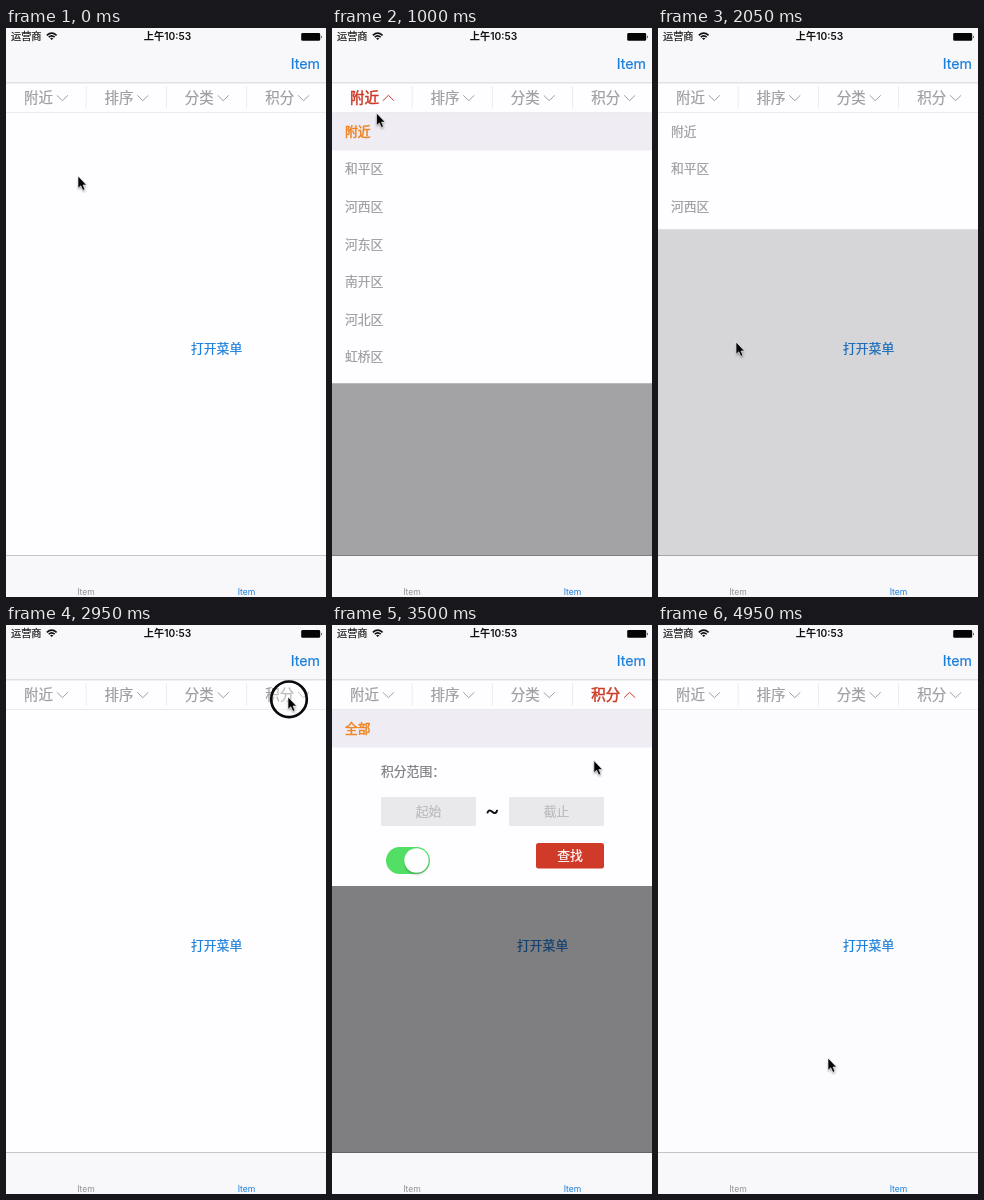
An HTML page for the animation above (4.99 s loop, 320x569 px).

```html
<!DOCTYPE html>
<html lang="zh-CN">
<head>
<meta charset="utf-8">
<title>Dropdown menu</title>
<style>
html, body { margin: 0; width: 100%; height: 100%; overflow: hidden; background: #fefdff; }
svg { display: block; width: 100vw; height: 100vh; }
text { font-family: Inter, "Noto Sans CJK SC", "Noto Sans CJK", sans-serif; fill: currentColor; }
.ink { stroke: currentColor; stroke-width: .22px; }
.lit { stroke-width: .5px; }
.blue { color: #1b7fdc; }
</style>
</head>
<body>
<svg id="stage" viewBox="0 0 320 569" preserveAspectRatio="none">
  <defs>
    <clipPath id="clip"><rect id="clipBox" x="0" y="84.5" width="320" height="0"/></clipPath>
    <filter id="soft" x="-50%" y="-50%" width="200%" height="200%"><feGaussianBlur stdDeviation="1.1"/></filter>
  </defs>
  <rect width="320" height="569" fill="#fefdff"/>
  <text class="blue ink" x="185" y="324.7" font-size="12.8">打开菜单</text>

  <rect y="527" width="320" height="42" fill="#f8f7f9"/>
  <rect y="527" width="320" height="1" fill="#c6c5c8"/>
  <g font-size="8.6" text-anchor="middle">
    <text x="80" y="567" color="#929194">Item</text>
    <text class="blue" x="240.5" y="567">Item</text>
  </g>

  <rect id="dim" y="84.5" width="320" height="443.5" fill="#020003" opacity="0"/>

  <g clip-path="url(#clip)">
    <rect y="84.5" width="320" height="377" fill="#fefdff"/>
    <rect id="mark" y="84.5" width="320" height="38" fill="#efedf3"/>
    <g id="areas"></g>
    <g id="score" font-size="12.8">
      <text id="all" x="13" y="107.7">全部</text>
      <text class="ink" x="49" y="151.4" color="#7c7b7d">积分范围：</text>
      <g fill="#e9e8ea">
        <rect x="49" y="172" width="95" height="29"/>
        <rect x="177" y="172" width="95" height="29"/>
      </g>
      <g color="#bcbbbf" text-anchor="middle">
        <text class="ink" x="96.5" y="191">起始</text>
        <text class="ink" x="224.5" y="191">截止</text>
      </g>
      <path d="M155.3 188.4C156 184.6 158.2 184.8 160.3 186.8S164.6 188.6 165.2 184.9" fill="none" stroke="#111" stroke-width="2"/>
      <rect x="54" y="222" width="44" height="27" rx="13.5" fill="#53df66"/>
      <circle cx="84.5" cy="237.5" r="12" fill="#000" opacity=".22" filter="url(#soft)"/>
      <circle cx="84.5" cy="235.5" r="12.2" fill="#fefefe"/>
      <rect x="204" y="218" width="68" height="25.5" rx="2.5" fill="#d03a28"/>
      <text class="ink" x="238" y="235.3" color="#fff" text-anchor="middle">查找</text>
    </g>
  </g>

  <rect width="320" height="55" fill="#f8f7f9"/>
  <rect y="54.5" width="320" height="1" fill="#c9c8cb"/>
  <rect y="55.5" width="320" height="28.5" fill="#fefdff"/>
  <rect y="84" width="320" height="1" fill="#ebeaec"/>
  <g id="tabs" font-size="14.5"></g>

  <text class="ink" x="5" y="12.4" font-size="10.2" color="#222">运营商</text>
  <g fill="none" stroke="#111" stroke-width="1.6">
    <path d="M40.8 7.4Q45.7 3 50.6 7.4M42.7 9.2Q45.7 6.6 48.7 9.2"/>
    <path d="M44.1 10.4L45.7 12L47.3 10.4Q45.7 9.2 44.1 10.4Z" fill="#111" stroke="none"/>
  </g>
  <text x="161.5" y="12.4" font-size="10.2" font-weight="600" color="#111" text-anchor="middle">上午10:53</text>
  <rect x="295.2" y="5" width="19" height="7.8" rx="1.4" fill="#050505"/>
  <path d="M315 7.4Q316.8 8.9 315 10.4Z" fill="#111"/>
  <text class="blue ink" x="314" y="41" font-size="14.2" text-anchor="end">Item</text>

  <g id="pointer">
    <circle id="press" cx="1" cy="2.3" r="17.8" fill="#fff" fill-opacity=".3" stroke="#0a0a0c" stroke-width="2.7"/>
    <path d="M0 2V14L3 11.5L5 16L7.5 15L5.5 10.5H9Z" fill="#000" opacity=".35" filter="url(#soft)"/>
    <path d="M0 0V12.3L2.8 9.8L4.8 14.3L6.9 13.4L5 9H8.6Z" fill="#050505" stroke="#fff" stroke-width=".6"/>
  </g>
</svg>
<script>
const LOOP = 4990, SLIDE = 450, TURN = 150;
const GRAY = '#9f9ea1', RED = '#cd3a26', ORANGE = '#ee811c';
const $ = id => document.getElementById(id);
const set = (el, k, v) => el.setAttribute(k, v);

function add(parent, tag, attrs, text) {
  const el = document.createElementNS('http://www.w3.org/2000/svg', tag);
  for (const k in attrs) set(el, k, attrs[k]);
  if (text) el.textContent = text;
  return parent.appendChild(el);
}

function tint(el, lit, color) {
  set(el, 'color', lit ? color : GRAY);
  set(el, 'class', lit ? 'ink lit' : 'ink');
}

const areaRows = ['附近', '和平区', '河西区', '河东区', '南开区', '河北区', '虹桥区', '北辰区', '西青区', '津南区']
  .map((s, i) => add($('areas'), 'text', { class: 'ink', x: 13, y: 107.7 + i * 37.6, 'font-size': 12.8, color: GRAY }, s));

const tabs = ['附近', '排序', '分类', '积分'].map((s, i) => {
  const x = i * 80.4;
  if (i) add($('tabs'), 'rect', { x: i * 80.2 - .5, y: 58.5, width: 1, height: 22, fill: '#ecebed' });
  return {
    x: x + 56.4,
    label: add($('tabs'), 'text', { x: x + 18, y: 75.2 }, s),
    arrow: add($('tabs'), 'path', { d: 'M-5.5 -2.7L0 2.7L5.5 -2.7', fill: 'none', 'stroke-width': 1 })
  };
});

// on/off: tap releases; open/close: start of each slide
const menus = [
  { tab: 0, height: 376, on: 680, open: 716, off: 1765, close: 1775 },
  { tab: 3, height: 176.5, on: 2990, open: 3015, off: 4500, close: 4538 }
];
const presses = [[545, 680], [1630, 1765], [2820, 2990], [4315, 4500]];
// time, x, y
const path = [
  [0, 72, 148], [40, 72, 148], [490, 41, 67], [900, 41, 67], [1410, 84, 299], [1610, 78, 314],
  [2140, 78, 314], [2320, 143, 239], [2790, 282, 72], [3200, 282, 72], [3500, 262, 135],
  [3910, 186, 418], [4290, 170, 433], [LOOP, 170, 433]
];

const clamp = v => Math.max(0, Math.min(1, v));

// cubic-bezier(.42, 0, .58, 1)
function ease(x) {
  x = clamp(x);
  let lo = 0, hi = 1;
  for (let i = 0; i < 24; i++) {
    const s = (lo + hi) / 2, r = 1 - s;
    if (1.26 * r * r * s + 1.74 * r * s * s + s * s * s < x) lo = s; else hi = s;
  }
  return lo * lo * (3 - 2 * lo);
}

function slope(i, k) {
  const a = path[i - 1], b = path[i], c = path[i + 1];
  if (!a || !c) return 0;
  const still = (p, q) => p[1] === q[1] && p[2] === q[2];
  return still(a, b) || still(b, c) ? 0 : (c[k] - a[k]) / (c[0] - a[0]);
}

function along(t, k) {
  let i = 0;
  while (i < path.length - 2 && t >= path[i + 1][0]) i++;
  const a = path[i], b = path[i + 1], d = b[0] - a[0], u = (t - a[0]) / d, v = 1 - u;
  return v * v * (1 + 2 * u) * a[k] + u * u * (3 - 2 * u) * b[k]
    + d * u * v * (v * slope(i, k) - u * slope(i + 1, k));
}

function draw(t) {
  const menu = menus[t < 2600 ? 0 : 1];
  const active = t >= menu.on && t < menu.off;
  const shown = ease((t - menu.open) / SLIDE) - ease((t - menu.close) / SLIDE);
  const turn = ease((t - menu.on) / TURN) - ease((t - menu.off) / TURN);

  tabs.forEach((tab, i) => {
    const mine = menu.tab === i, lit = active && mine;
    tint(tab.label, lit, RED);
    set(tab.arrow, 'stroke', lit ? RED : GRAY);
    set(tab.arrow, 'transform', `translate(${tab.x} 70) rotate(${mine ? 180 * turn : 0})`);
  });

  set($('clipBox'), 'height', menu.height * shown);
  set($('dim'), 'opacity', .5 * shown);
  set($('areas'), 'display', menu.tab ? 'none' : 'inline');
  set($('score'), 'display', menu.tab ? 'inline' : 'none');
  set($('mark'), 'display', active ? 'inline' : 'none');
  tint(areaRows[0], active, ORANGE);
  tint($('all'), active, ORANGE);

  set($('pointer'), 'transform', `translate(${along(t, 1)} ${along(t, 2)})`);
  set($('press'), 'display', presses.some(([a, b]) => t >= a && t < b) ? 'inline' : 'none');
}

const start = performance.now();
function tick(now) {
  draw(Math.max(0, now - start) % LOOP);
  requestAnimationFrame(tick);
}
draw(0);
requestAnimationFrame(tick);
</script>
</body>
</html>
```
